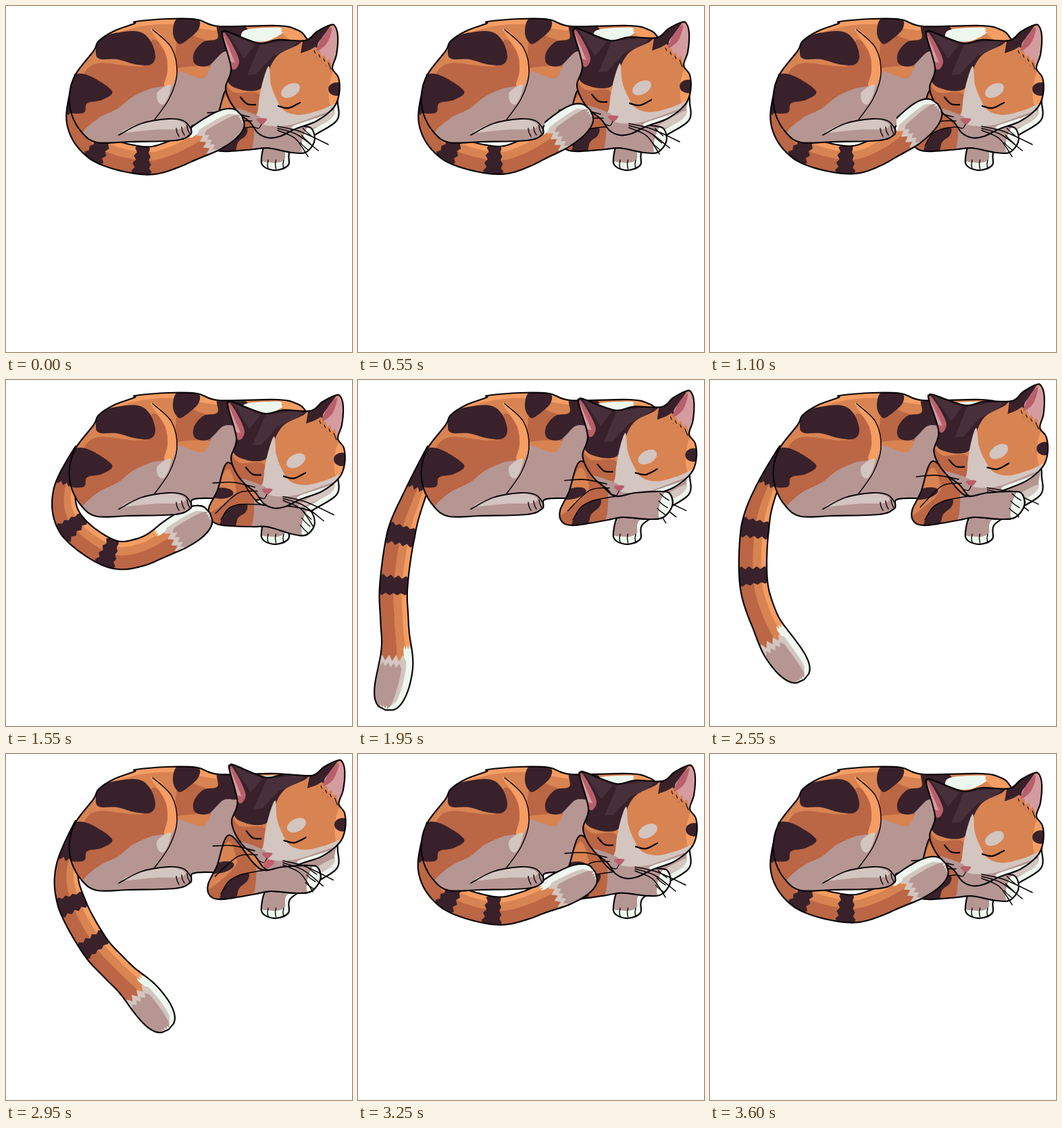
Write an HTML page with a canvas that moves like this. It is 512x512 px and loops after 3.8 s.

```html
<!DOCTYPE html>
<html lang="en">
<head>
<meta charset="utf-8">
<title>Sleeping cat</title>
<style>
  html, body { margin: 0; width: 100%; height: 100%; overflow: hidden; background: #fff; }
  canvas { display: block; width: 100vmin; height: 100vmin; }
</style>
</head>
<body>
<canvas id="stage" width="512" height="512"></canvas>
<script>
const c = document.getElementById('stage').getContext('2d');
const INK = '#080506', DARK = '#38212a', DARK_LIT = '#48303a', SHADE = '#bb6644', ORANGE = '#d88352',
  GLOW = '#f59d62', MAUVE = '#b59693', PALE = '#d3c5bf', WHITE = '#eef7ee', PINK = '#b95f6c', ROSE = '#d49c9f';

const clamp = (x, low, high) => Math.max(low, Math.min(high, x));
const ramp = (t, from, to) => clamp((t - from) / (to - from), 0, 1);
const ease = (t, from, to) => { const p = ramp(t, from, to); return p * p * (3 - 2 * p); };
const hat = (t, from, peak, to) => Math.min(ramp(t, from, peak), 1 - ramp(t, peak, to));

// Smooth curve through a flat list of x, y pairs.
function curve(pts, closed = true) {
  const n = pts.length / 2, path = new Path2D();
  const at = i => {
    i = closed ? (i + n) % n : clamp(i, 0, n - 1);
    return [pts[2 * i], pts[2 * i + 1]];
  };
  path.moveTo(...at(0));
  for (let i = 0; i < (closed ? n : n - 1); i++) {
    const [a, b, d, e] = [at(i - 1), at(i), at(i + 1), at(i + 2)];
    path.bezierCurveTo(b[0] + (d[0] - a[0]) / 6, b[1] + (d[1] - a[1]) / 6,
      d[0] - (e[0] - b[0]) / 6, d[1] - (e[1] - b[1]) / 6, d[0], d[1]);
  }
  if (closed) path.closePath();
  return path;
}
function polygon(pts) {
  const path = new Path2D();
  for (let i = 0; i < pts.length; i += 2) path.lineTo(pts[i], pts[i + 1]);
  path.closePath();
  return path;
}
function patch(color, ...pts) { c.fillStyle = color; c.fill(curve(pts)); }
function facet(color, ...pts) { c.fillStyle = color; c.fill(polygon(pts)); }
function spot(color, x, y, rx, ry, turn = 0) {
  c.fillStyle = color;
  c.beginPath();
  c.ellipse(x, y, rx, ry, turn, 0, 7);
  c.fill();
}
function line(width, ...pts) {
  c.strokeStyle = INK;
  c.lineWidth = width;
  c.stroke(curve(pts, false));
}
// Three short strokes between toes, each a step from the last.
function toes(x, y, stepX, stepY, dx, dy) {
  for (let i = 0; i < 3; i++, x += stepX, y += stepY) line(1.4, x, y, x + dx / 2 - 1, y + dy / 2, x + dx, y + dy);
}
// Fill a form, paint its markings inside it, then outline it.
function form(path, color, markings) {
  c.fillStyle = color;
  c.fill(path);
  c.save();
  c.clip(path);
  markings();
  c.restore();
  c.strokeStyle = INK;
  c.lineWidth = 2.2;
  c.stroke(path);
}
function clipRight(x, paint) {
  c.save();
  c.beginPath();
  c.rect(x, 0, 512, 512);
  c.clip();
  paint();
  c.restore();
}

// Smooth interpolation of [time, ...values] rows without overshoot.
function sample(keys, t) {
  const last = keys.length - 1;
  let i = 0;
  while (i < last - 1 && keys[i + 1][0] <= t) i++;
  const rate = (j, k) => (keys[j + 1][k] - keys[j][k]) / (keys[j + 1][0] - keys[j][0]);
  const slope = (j, k) => {
    if (j === 0 || j === last) return 0;
    const a = rate(j - 1, k), b = rate(j, k);
    return a * b <= 0 ? 0 : 2 * a * b / (a + b);
  };
  const a = keys[i], b = keys[i + 1], h = b[0] - a[0], p = clamp((t - a[0]) / h, 0, 1), q = 1 - p;
  return a.slice(1).map((v, k) => q * q * (1 + 2 * p) * v + p * p * (3 - 2 * p) * b[k + 1]
    + h * p * q * (q * slope(i, k + 1) - p * slope(i + 1, k + 1)));
}

// Tail pose: stretch, then direction in degrees at the root, one third, two thirds and the tip.
const ROOT = [114, 103], BONES = [70, 54, 71, 48, 57, 65];
const TAIL = [
  [0, .955, 97, 27, -18, -31],
  [1100, .95, 97, 27, -22, -42],
  [1550, .965, 114, 50, -12, -32],
  [1850, 1.12, 115, 106, 95, 106],
  [1950, 1.09, 114, 102, 87, 103],
  [2550, 1.015, 117, 97, 73, 53],
  [2950, .985, 110, 68, 46, 52],
  [3300, .955, 97, 27, -18, -31]
];

function tailSurface(t) {
  const [stretch, a, b, d, e] = sample(TAIL, t), joints = [ROOT];
  BONES.forEach((bone, i) => {
    const x = i * .6, [px, py] = joints[i];
    // Cubic through the four directions.
    const degrees = -a * (x - 1) * (x - 2) * (x - 3) / 6 + b * x * (x - 2) * (x - 3) / 2
      - d * x * (x - 1) * (x - 3) / 2 + e * x * (x - 1) * (x - 2) / 6;
    const angle = degrees * Math.PI / 180;
    joints.push([px + bone * stretch * Math.cos(angle), py + bone * stretch * Math.sin(angle)]);
  });
  const spine = u => {
    const i = Math.min(5, Math.floor(u)), f = u - i;
    const p = [i - 1, i, i + 1, i + 2].map(j => joints[clamp(j, 0, 6)]);
    return [0, 1].map(k => p[1][k] + f / 2 * (p[2][k] - p[0][k]
      + f * (2 * p[0][k] - 5 * p[1][k] + 4 * p[2][k] - p[3][k]
      + f * (3 * (p[1][k] - p[2][k]) + p[3][k] - p[0][k]))));
  };
  const width = u => (12 + 4.3 * Math.min(u, 2) + 5 * ease(u, 4.3, 5.2))
    * (u > 5.3 ? Math.sqrt(Math.max(0, 1 - ((u - 5.3) / .7) ** 2)) : 1);
  // u runs along the tail, v from its shaded side (-1) to its lit side (1).
  return (u, v) => {
    u = clamp(u, 0, 6);
    const [x, y] = spine(u), p = spine(Math.max(0, u - .01)), q = spine(Math.min(6, u + .01));
    const dx = q[0] - p[0], dy = q[1] - p[1], k = width(u) * v / (Math.hypot(dx, dy) || 1);
    return [x + dy * k, y - dx * k];
  };
}
function drawTail(t) {
  const at = tailSurface(t);
  const strip = (u0, u1, v0, v1, jag = 0) => {
    const pts = [], steps = 90, teeth = 8;
    const side = (from, to, v) => {
      for (let i = 0; i <= steps; i++) pts.push(...at(from + (to - from) * i / steps, v));
    };
    const fringe = (u, from, to, tooth) => {
      for (let i = 1; jag && i < teeth; i++) pts.push(...at(u + (i % 2 ? tooth : 0), from + (to - from) * i / teeth));
    };
    side(u0, u1, v1);
    fringe(u1, v1, v0, jag);
    side(u1, u0, v0);
    fringe(u0, v0, v1, -jag);
    return polygon(pts);
  };
  const paint = (color, ...area) => { c.fillStyle = color; c.fill(strip(...area)); };
  form(strip(0, 6, -1, 1), SHADE, () => {
    paint(ORANGE, 0, 6, 0, 1.1);
    paint(GLOW, 0, 6, .6, 1.1);
    paint(DARK, 0, .8, -1.1, 1.1, .07);
    for (const u of [2, 3]) paint(DARK, u - .17, u + .17, -1.1, 1.1, .06);
    paint(WHITE, 4.7, 6, .45, 1.1, .1);
    paint(WHITE, 5.3, 6, -1.1, 1.1);
    paint(PALE, 4.95, 5.7, -1.1, .6, .14);
    paint(MAUVE, 5.1, 5.85, -.95, .35, .1);
  });
}

const BODY = curve([192, 23, 240, 19, 283, 20, 315, 30, 400, 29, 430, 35, 446, 50, 470, 100,
  440, 160, 350, 180, 305, 175, 276, 177, 273, 190, 250, 199, 180, 201, 135, 202, 113, 188, 97, 160,
  94, 130, 103, 101, 130, 66, 137, 52, 160, 37, 190, 26]);

function drawBody() {
  form(BODY, ORANGE, () => {
    patch(SHADE, 85, 165, 110, 110, 135, 85, 205, 88, 217, 50, 240, 70, 248, 104, 255, 45, 280, 45, 330, 80, 330, 200, 120, 210);
    patch(ORANGE, 250, 94, 268, 90, 300, 90, 305, 100, 293, 110, 260, 106);
    patch(GLOW, 130, 58, 160, 42, 200, 30, 250, 27, 320, 36, 320, 10, 180, 10);
    patch(MAUVE, 112, 190, 137, 166, 165, 152, 188, 134, 215, 122, 240, 116, 254, 97, 292, 107,
      307, 80, 325, 66, 350, 66, 345, 185, 250, 212, 120, 212);
    patch(GLOW, 214, 35, 229, 42, 246, 65, 253, 95, 244, 121, 234, 118, 239, 95, 235, 68);
    patch(PALE, 242, 116, 243, 126, 235, 144, 226, 143, 224, 128);
    patch(DARK, 133, 66, 140, 46, 190, 37, 212, 49, 221, 74, 213, 87, 190, 86, 165, 79, 138, 78);
    patch(DARK, 90, 155, 92, 125, 102, 102, 125, 104, 157, 126, 142, 139, 120, 144, 115, 158);
    patch(DARK, 254, 18, 247, 40, 256, 56, 271, 48, 285, 34, 284, 20);
    patch(DARK, 314, 26, 350, 28, 360, 45, 345, 66, 322, 68, 300, 88, 280, 86, 278, 70, 292, 53, 313, 48);
    patch(WHITE, 348, 42, 360, 34, 406, 32, 412, 38, 385, 52, 355, 50);
    patch(GLOW, 408, 38, 415, 26, 440, 32, 452, 55, 425, 52);
    patch(PALE, 172, 187, 200, 174, 240, 167, 264, 174, 258, 182, 220, 183);
  });
  line(1.5, 217, 35, 245, 62, 253, 100, 242, 136, 220, 168);
  line(1.8, 167, 191, 200, 174, 240, 167, 263, 170, 274, 182);
  toes(252, 181, 8, -2, 4, 12);
}

function drawFarArm() {
  form(curve([483, 125, 491, 145, 489, 170, 455, 192, 421, 214, 418, 235, 400, 243,
    382, 238, 378, 225, 388, 195, 430, 150]), WHITE, () => {
    patch(MAUVE, 478, 130, 486, 152, 478, 168, 419, 205, 412, 227, 395, 232, 372, 225, 380, 190);
    patch(PALE, 484, 155, 449, 174, 430, 190, 477, 170);
  });
  toes(388, 241, 11.5, 0, 0, -13);
}

const ARM = curve([330, 120, 312, 166, 299, 193, 302, 210, 320, 215, 365, 208, 392, 203, 430, 206, 452, 203,
  465, 186, 462, 169, 449, 165, 410, 167, 382, 172, 365, 160]);

function drawArm(slope, reach) {
  c.save();
  c.translate(320, 0);
  c.transform(reach, slope, 0, 1, 0, 0);
  c.translate(-320, 0);
  form(ARM, MAUVE, () => {
    patch(SHADE, 320, 110, 355, 140, 370, 165, 358, 220, 290, 220, 295, 170);
    patch(ORANGE, 328, 130, 340, 150, 338, 168, 300, 200, 305, 175);
    spot(DARK, 318, 168, 20, 8, -.25);
    patch(DARK, 316, 218, 327, 192, 344, 179, 359, 177, 357, 188, 345, 199, 338, 217);
    spot(WHITE, 460, 184, 13, 30, .3);
  });
  line(1.5, 382, 172, 350, 178, 330, 188, 318, 207);
  toes(447, 168, -2, 11, 13, 10);
  c.restore();
}

const HEAD = curve([333, 92, 320, 44, 322, 38, 328, 38, 374, 55, 402, 50, 443, 51, 460, 38,
  480, 28, 487, 30, 491, 45, 489, 72, 483, 92, 492, 106, 493, 130, 485, 150, 460, 170, 428, 182, 405, 193, 388, 195,
  373, 188, 361, 172, 344, 158, 331, 140, 325, 120]);

function drawHead(yawn) {
  form(HEAD, ORANGE, () => {
    spot(GLOW, 490, 122, 12, 34, .1);
    patch(SHADE, 322, 112, 338, 128, 374, 130, 374, 166, 350, 166, 326, 145);
    patch(DARK, 310, 30, 345, 36, 376, 50, 437, 44, 434, 56, 406, 70, 393, 86, 386, 105, 374, 124, 345, 123, 325, 105);
    facet(DARK_LIT, 376, 57, 436, 49, 424, 60, 394, 75, 370, 101, 357, 102);
    facet(DARK_LIT, 327, 39, 369, 57, 352, 78);
    patch(PINK, 321, 40, 333, 54, 345, 82, 334, 92);
    facet(ROSE, 321, 42, 339, 84, 331, 82);
    facet(DARK, 440, 46, 484, 24, 470, 44, 461, 61, 436, 70);
    patch(ROSE, 486, 31, 471, 44, 461, 62, 482, 92, 498, 70);
    patch(PINK, 482, 32, 468, 46, 460, 66, 475, 55);
    for (let i = 0; i < 4; i++) {
      const x = 454 + 7 * i, y = 62 + 6 * i;
      facet(ORANGE, x - 6, y + 4, x + 4, y - 2, x + 8, y + 16);
      line(1.1, x + 2, y + 4, x + 6, y + 14);
    }
    spot(DARK, 489, 123, 12, 10);
    patch(PALE, 389, 89, 392, 116, 400, 137, 412, 155, 435, 161, 465, 154, 492, 145, 440, 194, 390, 202,
      358, 166, 371, 160, 375, 135, 381, 108);
    patch(MAUVE, 335, 152, 374, 163, 382, 176, 420, 176, 478, 157, 440, 186, 395, 202, 365, 190);
    patch(WHITE, 492, 146, 472, 161, 424, 178, 440, 182, 484, 160);
    spot(PALE, 421, 125, 15, 9.5, -.5);
  });
  patch(PINK, 371, 167, 386, 167, 380, 175, 376, 174);
  line(2.3, 347, 135, 357, 145, 369, 146);
  line(2.3, 403, 148, 418, 151, 435, 143);
  line(1.2, 378, 175, 374, 181, 367, 179);
  if (yawn > .05) patch('#c35e6b', 373, 182, 381, 177, 390, 180, 379, 180 + 13 * yawn);
}
function drawWhiskers() {
  line(1.7, 298, 158, 328, 157, 360, 164);
  line(1.5, 364, 170, 335, 173, 302, 203);
  for (let i = 0; i < 3; i++) line(1.6, 402, 178 + 3 * i, 436 - 4 * i, 186 + 5 * i, 477 - 15 * i, 205 + 9 * i);
}

function draw(t) {
  const awake = ease(t, 1100, 1550) - ease(t, 3300, 3600);
  const breath = t < 1100 ? Math.sin(Math.PI * t / 1100) ** 2 : 0;
  const yawn = hat(t, 2550, 2850, 3250);
  const dx = 8 * awake + 5 * hat(t, 2550, 2750, 2950) - breath;
  const dy = -22 * hat(t, 1100, 2900, 3600) - 4 * breath;
  const turn = .025 * yawn - .035 * hat(t, 1550, 2550, 2750);
  const rest = 1 - ease(t, 1550, 1900) + ease(t, 3150, 3400);
  const slope = .1 * rest + .1 * hat(t, 1100, 1550, 1850);
  const armInFront = t > 1650 && t < 3200, whiskersBehind = armInFront && t < 2700;

  const onHead = part => {
    c.save();
    c.translate(378 + dx, 170 + dy);
    c.rotate(turn);
    c.translate(-378, -170);
    part(yawn);
    c.restore();
  };
  const arm = () => drawArm(slope, 1 - .06 * rest);

  c.clearRect(0, 0, 512, 512);
  drawTail(t);
  drawBody();
  drawFarArm();
  arm();
  onHead(drawHead);
  if (whiskersBehind) onHead(drawWhiskers);
  if (armInFront) clipRight(372, arm);
  if (!whiskersBehind) onHead(drawWhiskers);
  // The curled tip lies over the chest.
  clipRight(276, () => drawTail(t));
}

c.lineJoin = c.lineCap = 'round';
function tick(now) {
  draw(Math.min(3600, Math.floor(now % 3800 / 50) * 50));
  requestAnimationFrame(tick);
}
requestAnimationFrame(tick);
</script>
</body>
</html>
```
